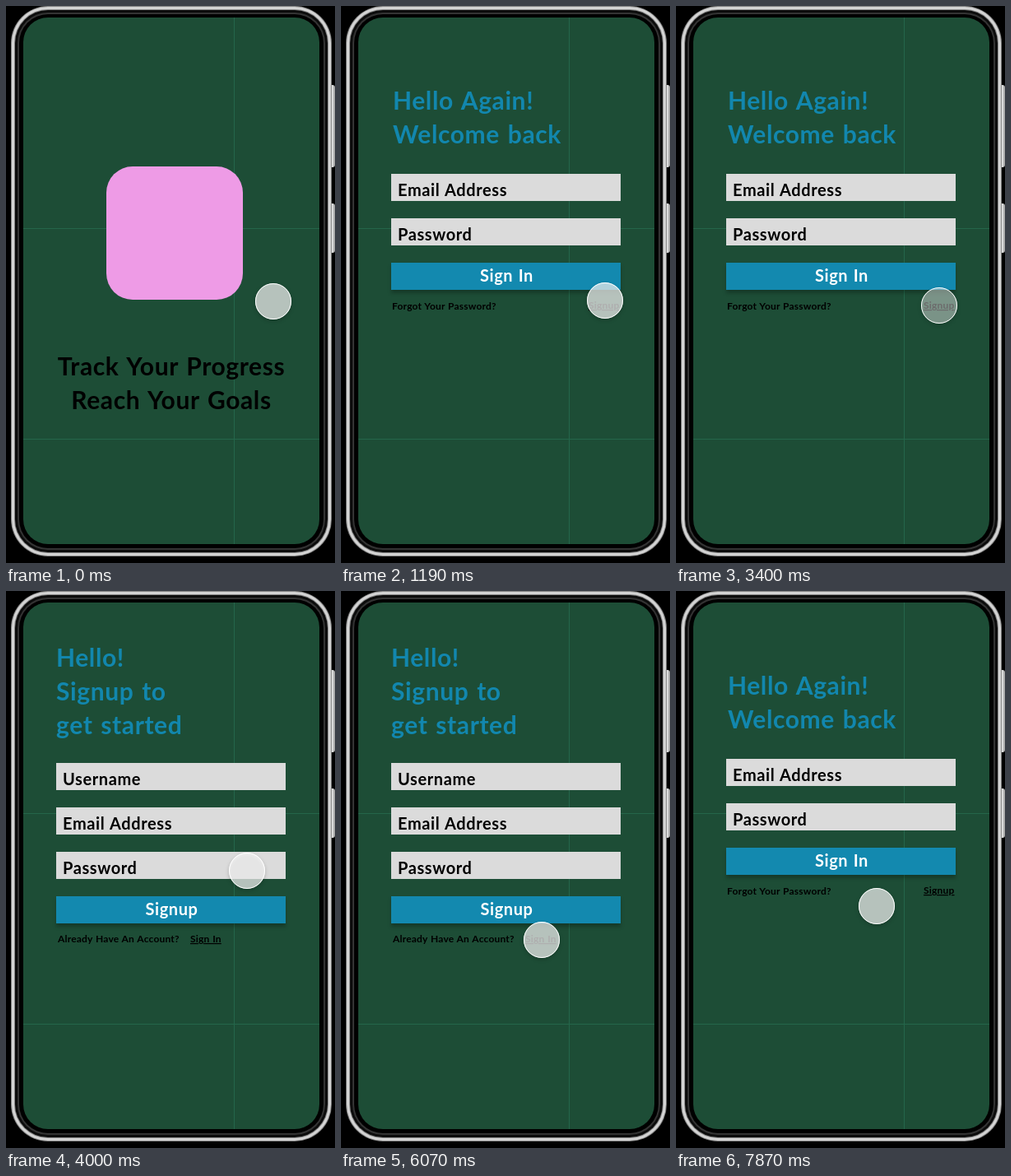
Recreate the animation shown at these times as an HTML page. Size 400 by 677 pixels, loop 8000 ms.

```html
<!DOCTYPE html>
<html lang="en">
<head>
<meta charset="utf-8">
<title>Fitness app sign-in</title>
<style>
  html, body { margin: 0; width: 100%; height: 100%; overflow: hidden; background: #000; }
  svg { display: block; width: 100%; height: 100%; }
  text { font-family: Lato, "Open Sans", sans-serif; font-weight: 700; white-space: pre; }
  .title { font-size: 30px; letter-spacing: .6px; word-spacing: 2px; }
  .blue { fill: #1287ae; }
  .label, .action { font-size: 20px; letter-spacing: .6px; word-spacing: 1px; }
  .action { fill: #fff; }
  .note { font-size: 12px; letter-spacing: .2px; word-spacing: .5px; }
  .link { text-decoration: underline 1px; }
  .mid { text-anchor: middle; }
  .field { fill: #dbdbdb; }
  .button { fill: #1389af; filter: drop-shadow(0 4px 2px rgba(0, 0, 0, .25)); }
  #dot { filter: drop-shadow(0 2px 2px rgba(0, 0, 0, .25)); }
</style>
</head>
<body>
<svg viewBox="0 0 400 677" xmlns="http://www.w3.org/2000/svg">
  <defs>
    <linearGradient id="key">
      <stop offset="0" stop-color="#777"/>
      <stop offset=".5" stop-color="#e4e4e4"/>
      <stop offset="1" stop-color="#9a9a9a"/>
    </linearGradient>
  </defs>
  <rect width="400" height="677"/>
  <rect x="393" y="96" width="7" height="100" rx="3" fill="url(#key)"/>
  <rect x="393" y="240" width="7" height="60" rx="3" fill="url(#key)"/>
  <g id="shell"></g>
  <rect x="21" y="14" width="360" height="640" rx="30" fill="#1d4d36"/>
  <path d="M277.5 14V654M21 270.5H381M21 526.5H381" stroke="#24664a" fill="none"/>
  <g id="welcome"></g>
  <g id="login"></g>
  <g id="signup"></g>
  <g id="dot">
    <circle id="fill" r="22" fill="#fafafa"/>
    <circle r="21.5" fill="none" stroke="#fff"/>
  </g>
</svg>
<script>
const LOOP = 8000;
const STEP = LOOP / 54;   // the picture advances in even steps
const LEAD = 12;
const NS = 'http://www.w3.org/2000/svg';
const $ = id => document.getElementById(id);

function add(parent, tag, attrs, content = '') {
  const el = document.createElementNS(NS, tag);
  for (const name in attrs) el.setAttribute(name, attrs[name]);
  el.textContent = content;
  $(parent).append(el);
}

const text = (parent, cls, x, y, content) => add(parent, 'text', { class: cls, x, y }, content);

const title = (parent, cls, x, y, lines) =>
  lines.forEach((line, i) => text(parent, `title ${cls}`, x, y + 41 * i, line));

function bar(parent, cls, y) {
  add(parent, 'rect', { class: cls, x: 61, y, width: 279, height: 33 });
}

function form(parent, top, labels, action) {
  const rowY = i => top + 54 * i;
  labels.forEach((label, i) => {
    bar(parent, 'field', rowY(i));
    text(parent, 'label', 69, rowY(i) + 27, label);
  });
  const y = rowY(labels.length);
  bar(parent, 'button', y);
  text(parent, 'action mid', 201.5, y + 23, action);
}

function ring(inset, fill) {
  add('shell', 'rect', {
    x: 6 + inset, y: inset, width: 390 - 2 * inset, height: 669 - 2 * inset, rx: 45 - inset, fill
  });
}

ring(0, '#858585');
ring(1, '#d4d4d4');
ring(4, '#858585');
ring(5, '#0c0c0c');
ring(8, '#333');
ring(10, '#000');

add('welcome', 'rect', { x: 122, y: 195, width: 166, height: 162, rx: 32, fill: '#ee9be6' });
title('welcome', 'mid', 201, 449, ['Track Your Progress', 'Reach Your Goals']);

title('login', 'blue', 63, 126, ['Hello Again!', 'Welcome back']);
form('login', 204, ['Email Address', 'Password'], 'Sign In');
text('login', 'note', 62, 369, 'Forgot Your Password?');
text('login', 'note link', 301, 368, 'Signup');

title('signup', 'blue', 61, 92, ['Hello!', 'Signup to', 'get started']);
form('signup', 209, ['Username', 'Email Address', 'Password'], 'Signup');
text('signup', 'note', 63, 427, 'Already Have An Account?');
text('signup', 'note link', 224, 427, 'Sign In');

// Pointer moves, timed in steps
const home = { x: 325, y: 359 };
const moves = [
  { from: 0, to: 2, x: 321, y: 358 },
  { from: 11, to: 16, x: 271, y: 340 },
  { from: 16, to: 19, x: 321, y: 357 },
  { from: 19, to: 21, x: 320, y: 364 },
  { from: 26, to: 29, x: 213, y: 266 },
  { from: 29, to: 32, x: 275, y: 454 },
  { from: 32, to: 34, x: 248, y: 433 },
  { from: 35, to: 41, x: 244, y: 424 },
  { from: 51, to: 53, x: 244, y: 383 }
];

const ease = p => (1 - Math.cos(Math.PI * p)) / 2;

function pointerAt(step) {
  let { x, y } = home;
  for (const m of moves) {
    const p = ease(Math.min(1, Math.max(0, (step - m.from) / (m.to - m.from))));
    x += (m.x - x) * p;
    y += (m.y - y) * p;
  }
  return { x, y };
}

function screenAt(step) {
  if (step < 8) return 'welcome';
  return step >= 24 && step < 49 ? 'signup' : 'login';
}

const isPressed = step => step === 5 || step === 23 || (step >= 44 && step < 48);

function draw(time) {
  const step = Math.min(53, Math.floor((time % LOOP + LEAD) / STEP));
  for (const id of ['welcome', 'login', 'signup'])
    $(id).style.display = id === screenAt(step) ? '' : 'none';
  const { x, y } = pointerAt(step);
  $('dot').setAttribute('transform', `translate(${Math.round(x)} ${Math.round(y)})`);
  $('fill').setAttribute('fill-opacity', isPressed(step) ? .43 : .7);
}

const start = performance.now();
function tick() {
  draw(performance.now() - start);
  requestAnimationFrame(tick);
}
tick();
</script>
</body>
</html>
```
